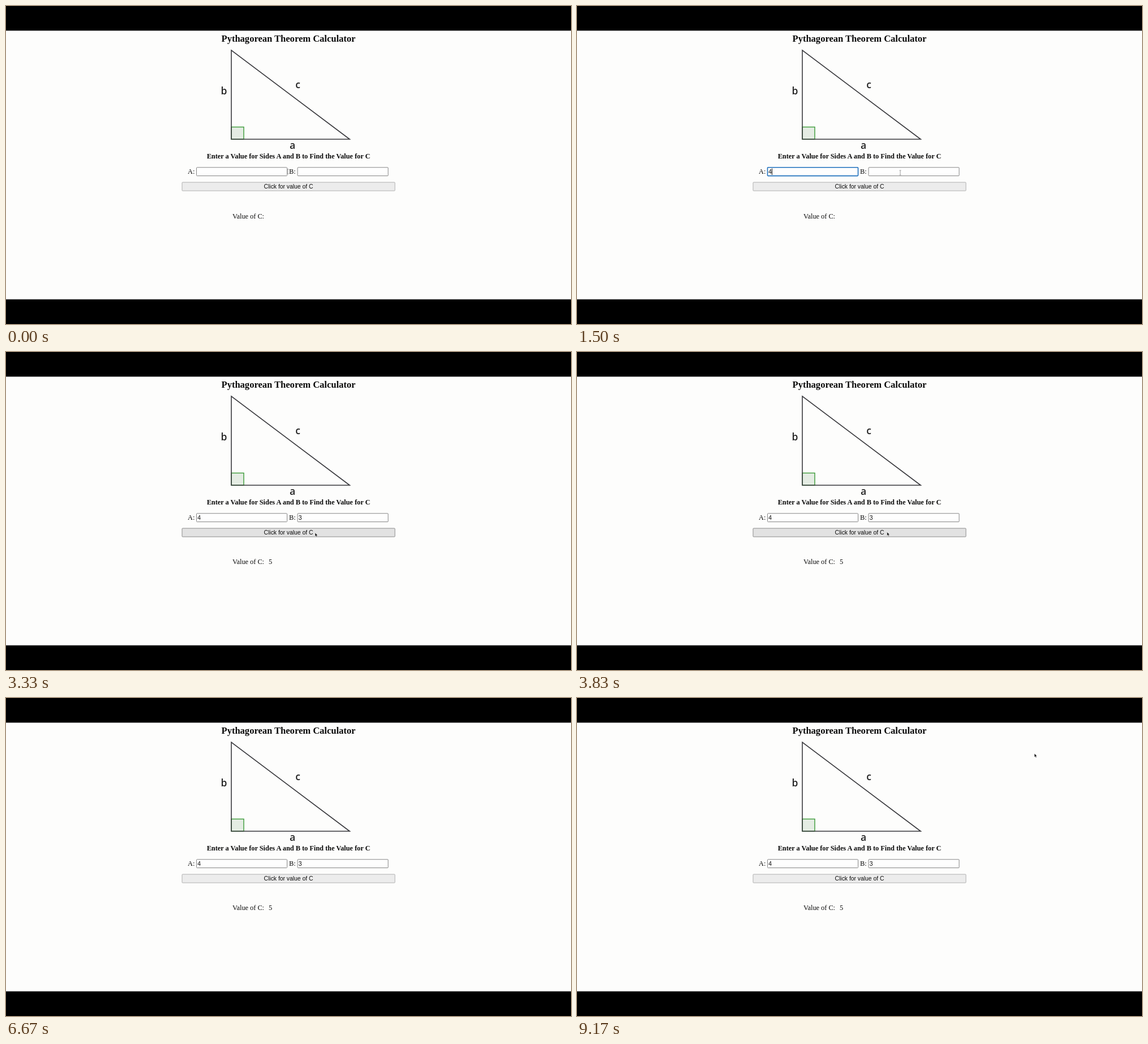
Write an HTML page that moves like this. It is 998 by 561 pixels and loops after 9.21 s.

```html
<!DOCTYPE html>
<html lang="en">
<head>
<meta charset="utf-8">
<title>Pythagorean Theorem Calculator</title>
<style>
  html, body { margin: 0; width: 100%; height: 100%; overflow: hidden; background: #000; }
  svg { display: block; width: 998px; height: 561px; }
  text { fill: #0a0a0a; }
  .serif { font: 12.3px "Liberation Serif", Times, serif; }
  .bold { font-weight: 700; text-anchor: middle; }
  .title { font-size: 16.55px; }
  .sans { font: 10.35px "Liberation Sans", Arial, sans-serif; }
  .side { font: 600 17.5px "Open Sans", "Noto Sans", sans-serif; text-anchor: middle; fill: #222; }
  .field { fill: #fefefe; stroke: #858585; }
  .field.focus { stroke: #1f70bd; stroke-width: 1.6; }
  #button { fill: #ececec; stroke: #b0b0b0; }
  #button.hover { fill: #e2e2e2; stroke: #8c8c8c; }
</style>
</head>
<body>
<svg viewBox="0 0 998 561">
  <rect y="43.5" width="998" height="474" fill="#fdfdfc"/>
  <text class="serif bold title" x="499" y="63">Pythagorean Theorem Calculator</text>

  <rect x="398" y="213.5" width="22" height="21.5" fill="#e4ece3" stroke="#3a9a37" stroke-width="1.4"/>
  <path d="M398 78V235H607Z" fill="none" stroke="#38383c" stroke-width="1.6"/>
  <text class="side" x="385" y="156">b</text>
  <text class="side" x="515.7" y="144.5">c</text>
  <text class="side" x="506" y="252">a</text>

  <text class="serif bold" x="499" y="269">Enter a Value for Sides A and B to Find the Value for C</text>
  <text class="serif" x="321" y="296">A:</text>
  <text class="serif" x="500" y="296">B:</text>
  <rect class="field" id="fieldA" x="336.5" y="284.8" width="160" height="14.8" rx="1"/>
  <rect class="field" id="fieldB" x="515" y="284.8" width="160" height="14.8" rx="1"/>
  <text class="sans" id="valueA" x="338.3" y="296">4</text>
  <text class="sans" id="valueB" x="516.8" y="296">3</text>
  <path id="caret" d="M0 286.5V298" stroke="#111"/>

  <rect id="button" x="311" y="311" width="376" height="15" rx="1"/>
  <text class="sans" x="499" y="322" text-anchor="middle">Click for value of C</text>
  <g id="result">
    <text class="serif" x="400" y="375">Value of C:</text>
    <text class="serif" id="answer" x="464" y="375">5</text>
  </g>

  <path id="beam" d="M-1.5 -4H1.5M0 -4V4M-1.5 4H1.5" fill="none" stroke="#888" stroke-width=".8"/>
  <path id="arrow" d="M0 0V6.3L1.5 5L2.6 7.3L3.6 6.8L2.6 4.6H4.6Z" fill="#111" stroke="#fff" stroke-width=".4"/>
</svg>
<script>
const LOOP = 9210;
const FOCUS_A = 550, TYPE_A = 1100, FOCUS_B = 1750, TYPE_B = 2200;
const CLICK = 3050, EXIT = 5900, RETURN = 9000;

// Pointer stops: time, x, y
const stops = [
  [0, 498, 292], [150, 498, 292], [450, 455, 293], [1100, 455, 293],
  [1450, 571, 294], [2150, 571, 294], [2500, 550, 328], [2650, 550, 328],
  [2900, 546, 319], [3800, 546, 319], [4550, 886, 44], [EXIT, 886, 44],
  [RETURN, 808, 98], [LOOP, 808, 98]
];
const $ = id => document.getElementById(id);
const show = (id, on) => $(id).style.display = on ? "" : "none";
const place = (id, x, y) => $(id).setAttribute("transform", `translate(${x} ${y})`);

function pointer(t) {
  const i = stops.findIndex(s => s[0] > t);
  const [t0, x0, y0] = stops[i - 1], [t1, x1, y1] = stops[i];
  const p = (t - t0) / (t1 - t0), e = p * p * (3 - 2 * p);
  return [x0 + (x1 - x0) * e, y0 + (y1 - y0) * e];
}

function draw(t) {
  const [x, y] = pointer(t);
  const inA = t >= FOCUS_A && t < FOCUS_B;
  const inB = t >= FOCUS_B && t < CLICK;
  const typedA = t >= TYPE_A, typedB = t >= TYPE_B, done = t >= CLICK;
  const lastKey = inA ? (typedA ? TYPE_A : FOCUS_A) : (typedB ? TYPE_B : FOCUS_B);

  $("fieldA").classList.toggle("focus", inA);
  $("fieldB").classList.toggle("focus", inB);
  show("valueA", typedA);
  show("valueB", typedB);
  show("caret", (inA || inB) && (t - lastKey) % 1000 < 500);
  place("caret", inA ? (typedA ? 344.5 : 338.5) : (typedB ? 522.8 : 517), 0);

  $("button").classList.toggle("hover", x > 311 && x < 687 && y > 311 && y < 326);
  show("answer", done);
  place("result", 0, done ? -1 : 0);

  const overField = y > 284 && y < 300 && t < CLICK;
  show("beam", overField);
  show("arrow", !overField && (t < EXIT || t >= RETURN));
  place("beam", x, y);
  place("arrow", x, y);
}

const start = performance.now();
function tick() {
  draw((performance.now() - start) % LOOP);
  requestAnimationFrame(tick);
}
tick();
</script>
</body>
</html>
```
